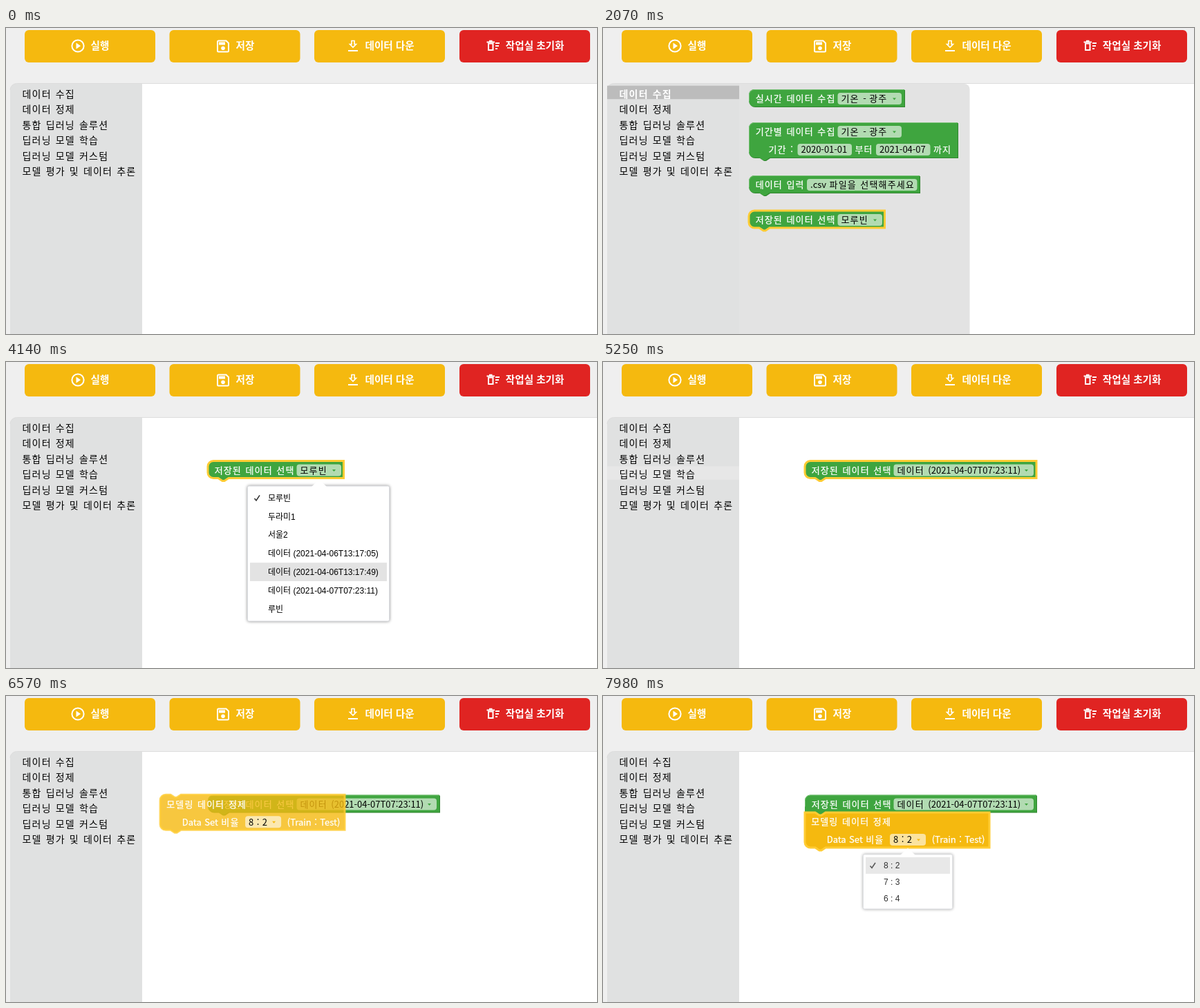
Write an HTML page that moves like this. It is 855 by 444 pixels and loops after 8 s.

```html
<!DOCTYPE html>
<html lang="ko">
<head>
<meta charset="utf-8">
<title>Block editor</title>
<style>
  html, body { margin: 0; width: 100%; height: 100%; overflow: hidden; background: #efefef; }
  svg { display: block; width: 855px; height: 444px; }
  text { font-family: "Noto Sans CJK KR", "Noto Sans", sans-serif; white-space: pre; word-spacing: .06em; }
  .btn { font-size: 14.6px; font-weight: 700; fill: #fff; word-spacing: 0; }
  .btn .k { letter-spacing: 0; }
  .cat { font-size: 14px; fill: #000; }
  .cat.on { font-weight: 700; fill: #fff; }
  .lab { font-size: 13px; fill: #fff; stroke: #fff; stroke-width: .25; }
  .val { font-size: 13px; fill: #000; }
  .k { letter-spacing: .087em; }
  .item { font: 12px "Liberation Sans", "Noto Sans CJK KR", sans-serif; fill: #000; word-spacing: 0; }
  .icon { fill: none; stroke: #fff; stroke-width: 2; }
  .icon .solid { fill: #fff; stroke: none; }
  .light { fill: none; stroke-width: 1; }
  .sel .face { stroke: #fc3; stroke-width: 3; }
  .sel .light, .sel .dark { display: none; }
  .drag .face { fill-opacity: .8; stroke-opacity: .8; }
  .field { fill: #fff; fill-opacity: .6; }
  .hot .field { stroke: #fff; stroke-width: 2; }
  .panel { fill: #fff; stroke: #dadce0; filter: drop-shadow(0 0 2px rgba(0,0,0,.45)); }
</style>
</head>
<body>
<svg id="stage" viewBox="0 0 855 444"></svg>
<script>
const LOOP = 8000;
const GREEN = { face: '#3fa53f', light: '#72bf70', dark: '#30862f' };
const GOLD = { face: '#f5b90f', light: '#f9d05a', dark: '#c8960c' };
const NAME = '모루빈';
const STAMP = '데이터 (2021-04-07T07:23:11)';

const HANGUL = /[가-힣]+( [가-힣]+)* ?/g;
const spaced = s => s.replace(HANGUL, m => `<tspan class="k">${m}</tspan>`);

// Text centred on a line at height cy
const text = (x, cy, s, cls, size = 13) =>
  `<text x="${x}" y="${cy + size * .37}" class="${cls}">${s}</text>`;
const label = (x, cy, s) => text(x, cy, spaced(s), 'lab');

function field(x, cy, w, s, color) {
  const ax = x + w - 10.5;
  const arrow = color
    ? `<path d="M${ax - 2.5},${cy - 1}h5l-2.5,3z" fill="${color.face}"/>` : '';
  return `<g class="input"><rect class="field" x="${x}" y="${cy - 8.5}" width="${w}" height="17" rx="4"/>` +
    text(x + 5, cy, spaced(s), 'val') + arrow + '</g>';
}

// o: top / bottom = notches, sqTop / sqBottom = square left corners
function outline(w, h, o) {
  const start = o.sqTop ? 'M0,0' : 'M0,8A8,8 0 0 1 8,0';
  const top = o.top ? 'H15l6,4h3l6,-4' : '';
  const bottom = o.bottom ? 'H30l-6,4h-3l-6,-4' : '';
  const end = o.sqBottom ? 'H0Z' : 'H8A8,8 0 0 1 0,' + (h - 8) + 'Z';
  return `${start}${top}H${w}V${h}${bottom}${end}`;
}
function rim(w, h, o) {
  const corner = o.sqTop ? 'V.5H8' : 'V8A7.5,7.5 0 0 1 8,.5';
  return `M.5,${h - 8}${corner}${o.top ? 'H15l6,4h3l6,-4' : ''}H${w - .5}`;
}

function block(id, x, y, w, h, color, o, inner) {
  const d = outline(w, h, o);
  return `<g id="${id}" transform="translate(${x} ${y})">
    <path class="dark" d="${d}" fill="${color.dark}" transform="translate(1 1)"/>
    <path class="face" d="${d}" fill="${color.face}"/>
    <path class="light" d="${rim(w, h, o)}" stroke="${color.light}"/>${inner}</g>`;
}

const FOOT = { bottom: 1 };
const BOTH = { top: 1, bottom: 1 };
const WIDE = 335, SPLIT_W = 267, SPLIT_H = 51;

const chooser = (id, x, y, w, fw, value) =>
  block(id, x, y, w, 25, GREEN, FOOT,
    label(9.7, 13.5, '저장된 데이터 선택') + field(128.5, 13.5, fw, value, GREEN));

const splitter = (id, x, y) =>
  block(id, x, y, SPLIT_W, SPLIT_H, GOLD, BOTH,
    label(9.2, 13.5, '모델링 데이터 정제') + label(31.7, 39.5, 'Data Set 비율') +
    field(123, 39.5, 52, '8 : 2', GOLD) + label(183.7, 39.5, '(Train : Test)'));

const flyout = (id, right, inner) =>
  `<g id="${id}"><path d="M197,81H${right - 8}a8,8 0 0 1 8,8V444H197z" fill="#ddd" fill-opacity=".8"/>${inner}</g>`;

function menu(id, x, y, w, h, tip, pitch, items) {
  const rows = items.map((s, i) => text(x + 30, y + 4 + pitch * (i + .5), s, 'item', 12)).join('');
  const cy = y + 4 + pitch / 2;
  return `<g id="${id}">
    <rect class="panel" x="${x + .5}" y="${y}" width="${w}" height="${h}" rx="2"/>
    <path d="M${tip - 11},${y + 1}l11,-10.5l11,10.5z" fill="#fff"/>
    <rect class="bar" x="${x + 4}" y="${y + 4}" width="${w - 7}" height="${pitch}" fill="#e3e3e3"/>
    <path d="M${x + 10.5},${cy + .5}l2.5,3l5,-7.5" fill="none" stroke="#333" stroke-width="1.6"/>${rows}</g>`;
}

const ICONS = {
  play: '<circle cx="104" cy="26" r="8.6"/><path class="solid" d="M101.5,21.5v9l6.5,-4.5z"/>',
  save: '<path d="M307.5,18.5h11l3.5,3.5v11a1.5,1.5 0 0 1-1.5,1.5h-13a1.5,1.5 0 0 1-1.5-1.5v-13a1.5,1.5 0 0 1 1.5-1.5z"/>' +
    '<path class="solid" d="M308,20.5h9v4h-9z"/><circle class="solid" cx="314" cy="29.3" r="2.8"/>',
  down: '<path d="M495,33h14"/><path d="M500,18.5h4v5h2.5l-4.5,4.5l-4.5,-4.5h2.5z" stroke-width="1.6"/>',
  wipe: '<path d="M698,22.5v9.5h6.5v-9.5z"/><path d="M695.5,20.5h11.5M699,18.8h4.5M708,22h6M708,26h5M708,30h3"/>'
};
const button = (x, fill, icon, tx, s) =>
  `<rect x="${x}" y="3" width="189" height="47" rx="6" fill="${fill}"/>
   <g class="icon">${ICONS[icon]}</g>` + text(tx, 26, s, 'btn', 14.6);

const CATS = ['데이터 수집', '데이터 정제', '통합 딥러닝 솔루션', '딥러닝 모델 학습',
  '딥러닝 모델 커스텀', '모델 평가 및 데이터 추론'];

const stage = document.getElementById('stage');
stage.innerHTML =
  '<rect width="855" height="444" fill="#efefef"/>' +
  button(27, GOLD.face, 'play', 122.5, '실행') +
  button(236.5, GOLD.face, 'save', 332.5, '저장') +
  button(446, GOLD.face, 'down', 519.5, '데이터 다운') +
  button(656, '#e02422', 'wipe', 722.8, '작업실 초기화') +
  '<path d="M197,80.5H856V445H197z" fill="#fff"/>' +
  '<path d="M6,444V90a9.5,9.5 0 0 1 9.5,-9.5H197V444z" fill="#e0e1e1"/>' +
  '<path d="M6,90a9.5,9.5 0 0 1 9.5,-9.5H855" fill="none" stroke="#dcdcdc"/>' +
  '<rect id="row" x="6" width="191" height="19.5"/>' +
  CATS.map((s, i) => text(23.5, 95.6 + 22.5 * i, spaced(s), 'cat', 14)).join('') +
  chooser('pick', 292, 143.5, 196.5, 64.5, NAME) +
  chooser('picked', 292, 143.5, WIDE, 202.5, STAMP) +
  `<g id="marker"><path d="${outline(SPLIT_W, SPLIT_H, { ...BOTH, sqTop: 1 })}" transform="translate(292 169)" fill="#a3a3a3"/>
   <path d="M300,169h7l6,4h3l6,-4h4" fill="none" stroke="#fc3" stroke-width="3.5"/></g>` +
  flyout('fly0', 530.5,
    block('a0', 211, 89, 225, 25, GREEN, {},
      label(9.7, 13.5, '실시간 데이터 수집') + field(128.5, 13.5, 92.5, '기온 - 광주', GREEN)) +
    block('a1', 211, 137, 302, 51, GREEN, FOOT,
      label(9.7, 13.5, '기간별 데이터 수집') + field(128.5, 13.5, 92.5, '기온 - 광주', GREEN) +
      label(28.5, 39.5, '기간 :') + field(70.5, 39.5, 78.5, '2020-01-01') +
      label(153.5, 39.5, '부터') + field(184, 39.5, 78.5, '2021-04-07') + label(267, 39.5, '까지')) +
    block('a2', 211, 214, 247, 25, GREEN, FOOT,
      label(9.7, 13.5, '데이터 입력') + field(84, 13.5, 159.5, '.csv 파일을 선택해주세요')) +
    chooser('a3', 211, 265, 196.5, 64.5, NAME)) +
  flyout('fly1', 495.5,
    block('b0', 211, 89, 120, 25, GOLD, { top: 1 }, label(9.2, 13.5, '수집 데이터 정제')) +
    splitter('b1', 211, 137)) +
  splitter('split', 292, 169) +
  '<circle id="ripple" cx="315" cy="172" fill="none" stroke="#888" stroke-width="10"/>' +
  menu('menu0', 349, 180, 205, 196, 453, 26.8, [NAME, '두라미1', '서울2',
    '데이터 (2021-04-06T13:17:05)', '데이터 (2021-04-06T13:17:49)', STAMP, '루빈']) +
  menu('menu1', 376, 233, 129, 79, 441, 24, ['8 : 2', '7 : 3', '6 : 4']);

const el = {};
stage.querySelectorAll('[id]').forEach(e => el[e.id] = e);
const cats = [...stage.querySelectorAll('.cat')];

const show = (e, on) => e.setAttribute('display', on ? 'inline' : 'none');
const flag = (e, name, on) => e.classList.toggle(name, on);
const move = (e, x, y) => e.setAttribute('transform', `translate(${x} ${y})`);
const within = (t, a, b) => t >= a && t < b;
const part = (t, a, b) => Math.min(1, Math.max(0, (t - a) / (b - a)));
const smooth = p => p * p * (3 - 2 * p);
const easeOut = p => 1 - (1 - p) ** 2;
const mix = (a, b, p) => a + (b - a) * p;

// Value of the last step already reached
const step = (t, list) => list.reduce((v, [at, next]) => t >= at ? next : v, -1);

function reshape(e, w, h, o) {
  const d = outline(w, h, o);
  e.querySelector('.face').setAttribute('d', d);
  e.querySelector('.dark').setAttribute('d', d);
  e.querySelector('.light').setAttribute('d', rim(w, h, o));
}

function drawMenu(e, t, from, to, y, pitch, hover) {
  show(e, within(t, from, to));
  const p = easeOut(part(t, from, from + 250));
  e.setAttribute('opacity', p);
  move(e, 0, -16 * (1 - p));
  const bar = e.querySelector('.bar');
  show(bar, hover >= 0);
  bar.setAttribute('y', y + 4 + pitch * Math.max(0, hover));
}

function draw(t) {
  // Categories and their flyouts
  const open = step(t, [[930, 0], [2790, -1], [5880, 1], [6480, -1]]);
  const over = step(t, [[660, 0], [930, -1], [5250, 3], [5340, 2], [5430, 1], [5880, -1], [6120, 2], [6170, -1]]);
  const row = over >= 0 ? over : open;
  cats.forEach((c, i) => flag(c, 'on', i === open));
  show(el.row, row >= 0);
  el.row.setAttribute('y', 83.7 + 22.5 * row);
  el.row.setAttribute('fill', row === open ? '#bcbcbc' : '#e7e7e7');
  show(el.fly0, open === 0);
  show(el.fly1, open === 1);

  const lit = step(t, [[1350, 0], [1470, 1], [1620, 2], [1740, 3], [1860, 2], [2070, 3]]);
  for (let i = 0; i < 4; i++) flag(el['a' + i], 'sel', i === lit);
  flag(el.b1, 'sel', t >= 6180);

  // First block: drag out, then choose a value
  const p = smooth(part(t, 2780, 3060));
  show(el.pick, within(t, 2790, 4920));
  move(el.pick, mix(211, 292, p), mix(265, 143.5, p));
  flag(el.pick, 'sel', true);
  flag(el.pick, 'drag', t < 3240);
  flag(el.pick, 'hot', within(t, 3570, 3840));
  drawMenu(el.menu0, t, 3770, 4920, 180, 26.8,
    step(t, [[3840, 0], [3930, 1], [3990, 2], [4060, 3], [4130, 4], [4440, 5]]));

  const near = within(t, 6810, 7290), joined = t >= 7290;
  show(el.picked, t >= 4920);
  flag(el.picked, 'sel', t < 6480);
  reshape(el.picked, WIDE, 25, { bottom: 1, sqBottom: near || joined });

  // Second block: drag out, snap below the first
  const q = smooth(part(t, 6470, 6890)), r = smooth(part(t, 6900, 7080));
  show(el.split, t >= 6480);
  show(el.marker, near);
  flag(el.split, 'sel', true);
  flag(el.split, 'drag', !joined);
  flag(el.split, 'hot', within(t, 7560, 7910));
  reshape(el.split, SPLIT_W, SPLIT_H, { ...BOTH, sqTop: joined });
  if (joined) move(el.split, 292, 169);
  else move(el.split, mix(211, 294, q) + 8.5 * r, mix(137, 180, q) - r);

  const wave = part(t, 7275, 7440);
  show(el.ripple, joined && wave < 1);
  el.ripple.setAttribute('r', 25 * wave);
  el.ripple.setAttribute('opacity', 1 - wave);

  drawMenu(el.menu1, t, 7840, LOOP, 233, 24, step(t, [[7910, 0]]));
}

const begin = performance.now();
function tick() {
  draw((performance.now() - begin) % LOOP);
  requestAnimationFrame(tick);
}
tick();
</script>
</body>
</html>
```
